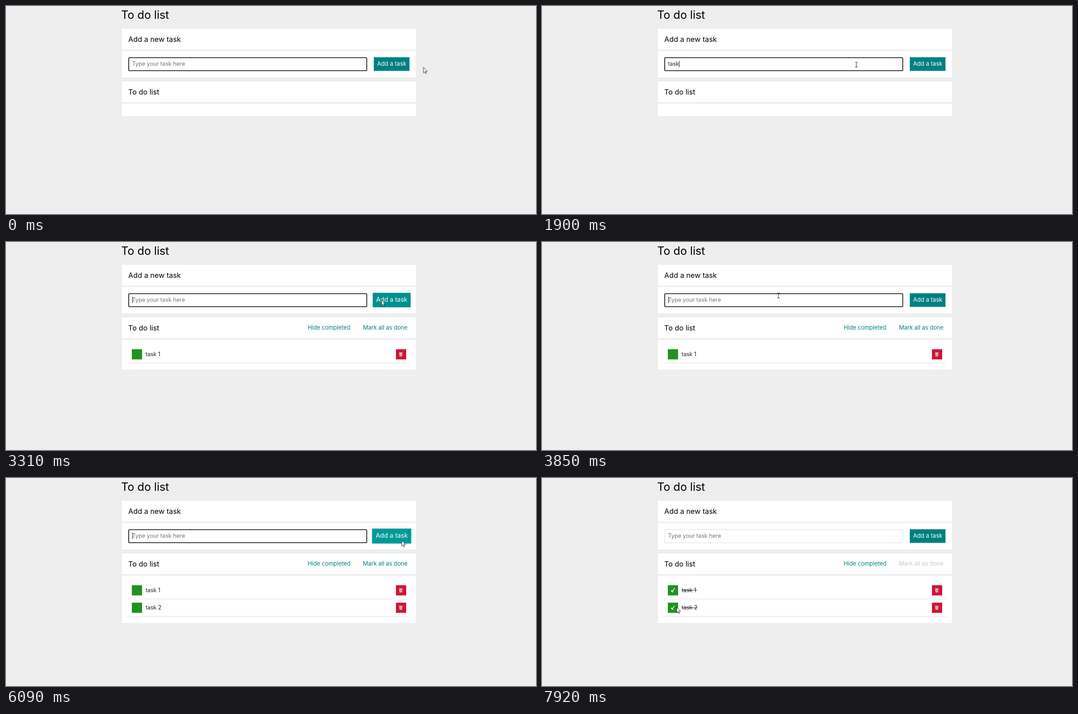
Animation, 1192 px wide and 470 px high, one loop 8 s. Source, as an HTML page:

```html
<!DOCTYPE html>
<html lang="en">
<head>
<meta charset="utf-8">
<title>To do list</title>
<style>
  html, body { margin: 0; width: 100%; height: 100%; overflow: hidden; background: #eee; }
  svg { display: block; width: 1192px; height: 470px; }
  text { font: 400 12.4px Inter, "Open Sans", sans-serif; fill: #222; white-space: pre; }
  .title { font-size: 25.2px; fill: #000; }
  .head { font-size: 16.3px; fill: #000; }
  .link { font-size: 12.9px; fill: #008080; }
  .hint { font-size: 12.7px; fill: #757575; }
  .card { fill: #fff; stroke: #e3e3e3; }
  .rule { fill: #e6e6e6; }

  .add, .add rect, .list, .item1, .item2, .done1, .done2, .focus, .blur,
  .markall, .pointer, .arrow, .beam { animation: 8s linear infinite; }
  .list, .item1, .item2, .done1, .done2, .focus, .blur, .arrow, .beam { animation-timing-function: step-end; }

  .list { animation-name: grow; }
  .item1 { animation-name: show1; }
  .item2 { animation-name: show2; }
  .done1, .blur { animation-name: check1; }
  .done2 { animation-name: check2; }
  .focus { animation-name: unfocus; }
  .markall { animation-name: fade; }
  .arrow { animation-name: arrow; }
  .beam { animation-name: beam; }
  .pointer { animation-name: move; }
  .add { transform-origin: 867.4px 131.2px; animation-name: swell; }
  .add rect { animation-name: tint; }
  .add text { font-size: 13.1px; fill: #fff; }

  @keyframes grow { 0% { height: 80.5px } 39.5% { height: 119.9px } 75.125%, 100% { height: 159.3px } }
  @keyframes show1 { 0% { visibility: hidden } 39.5%, 100% { visibility: visible } }
  @keyframes show2 { 0% { visibility: hidden } 75.125%, 100% { visibility: visible } }
  @keyframes check1 { 0% { visibility: hidden } 86.5%, 100% { visibility: visible } }
  @keyframes check2 { 0% { visibility: hidden } 95%, 100% { visibility: visible } }
  @keyframes unfocus { 0% { visibility: visible } 86.5%, 100% { visibility: hidden } }
  @keyframes fade { 0%, 95% { fill: #008080 } 98%, 100% { fill: #c8c8c8 } }
  @keyframes swell {
    0%, 4.75%, 8.7%, 33.75%, 43%, 69.6%, 80.5%, 100% { transform: scale(1) }
    6.3% { transform: scale(1.07) }
    36.25%, 40.5%, 72.4%, 78% { transform: scale(1.1) }
  }
  @keyframes tint {
    0%, 4.75%, 8.7%, 33.75%, 43%, 69.6%, 80.5%, 100% { fill: #008080 }
    6.3% { fill: #009292 }
    36.25%, 40.5%, 72.4%, 78% { fill: #009999 }
  }
  @keyframes arrow {
    0%, 33.6%, 69.4%, 100% { visibility: visible }
    6.7%, 43% { visibility: hidden }
  }
  @keyframes beam {
    0%, 33.6%, 69.4%, 100% { visibility: hidden }
    6.7%, 43% { visibility: visible }
  }
  @keyframes move {
    0%, 2.625% { transform: translate(938.5px, 138px) }
    3.75% { transform: translate(925px, 138px) }
    5.6% { transform: translate(860px, 137px) }
    7.5% { transform: translate(770px, 134px) }
    10% { transform: translate(715px, 132.5px) }
    12.25%, 31.625% { transform: translate(707px, 132.5px) }
    33% { transform: translate(790px, 129px) }
    34.6% { transform: translate(903px, 129px) }
    36.375%, 40.2% { transform: translate(884.5px, 132.5px) }
    41.5% { transform: translate(840px, 130px) }
    43% { transform: translate(720px, 124px) }
    45.5% { transform: translate(565px, 120px) }
    47%, 51% { transform: translate(532px, 121px) }
    51.1%, 68.375% { transform: translate(531px, 122px) }
    69.4% { transform: translate(800px, 133px) }
    72.25%, 77% { transform: translate(889.5px, 140.5px) }
    78% { transform: translate(872px, 146px) }
    79% { transform: translate(700px, 175px) }
    80% { transform: translate(530px, 205px) }
    81% { transform: translate(400px, 230px) }
    82.2% { transform: translate(318px, 243px) }
    83.6%, 89.375% { transform: translate(297px, 244px) }
    91% { transform: translate(299px, 264px) }
    93% { transform: translate(302px, 288px) }
    94.5%, 100% { transform: translate(302.5px, 291.5px) }
  }
</style>
</head>
<body>
<svg viewBox="0 0 1192 470">
  <defs>
    <g id="row">
      <rect x="283" y="242.3" width="23" height="23" fill="#229122"/>
      <rect x="877" y="242.3" width="23" height="23" fill="#d11339"/>
      <path d="M884.2 249.8h7.4l-.9 8.6h-5.6z" fill="#e3cfb4"/>
      <path d="M883.8 249.3h8.2M886.2 251.5l.4 6M888 251.5v6M889.7 251.5l-.4 6" stroke="#a9876a" stroke-width=".8" fill="none"/>
      <rect x="275" y="272.8" width="633" height="1" fill="#ddd"/>
    </g>
    <path id="tick" d="M290 254.4l2-1.3 1.5 2.3c1.2-3 2.6-5.2 5-6.9l.6.7c-2.2 2.5-3.7 5.5-4.8 9.3h-1.6z" fill="#fff"/>
  </defs>

  <text class="title" x="259" y="29">To do list</text>

  <rect class="card" x="259.5" y="50.5" width="664" height="112"/>
  <text class="head" x="275" y="80.5">Add a new task</text>
  <rect class="rule" x="260" y="99" width="663" height="2"/>
  <rect class="blur" x="275.5" y="116.5" width="536" height="30" fill="#fff" stroke="#ddd"/>
  <rect class="focus" x="276" y="116.7" width="535.4" height="29.5" rx="2" fill="#fff" stroke="#000" stroke-width="1.6"/>
  <text class="hint" id="hint" x="283.5" y="135">Type your task here</text>
  <text id="entry" x="283.5" y="135"></text>
  <path id="wavy" d="M284 137.8l1.5-1.5 1.5 1.5 1.5-1.5 1.5 1.5 1.5-1.5 1.5 1.5 1.5-1.5 1.5 1.5 1.5-1.5 1.5 1.5 1.5-1.5 1.5 1.5 1.5-1.5 1.5 1.5 1.5-1.5 1.5 1.5" fill="none" stroke="#f33"/>
  <rect id="caret" y="124" width="1" height="14"/>
  <g class="add">
    <rect x="827.2" y="115.8" width="80.3" height="30.8"/>
    <text x="867.5" y="135" text-anchor="middle">Add a task</text>
  </g>

  <rect class="card list" x="259.5" y="169.5" width="664" height="80.5"/>
  <text class="head" x="275" y="199.5">To do list</text>
  <rect class="rule" x="260" y="218" width="663" height="2"/>
  <g class="item1">
    <text class="link" x="678.5" y="197.5">Hide completed</text>
    <text class="link markall" x="903" y="197.5" text-anchor="end">Mark all as done</text>
    <use href="#row"/>
    <text x="314" y="258">task 1</text>
  </g>
  <g class="done1">
    <use href="#tick"/>
    <rect x="314" y="253" width="34" height="1" fill="#222"/>
  </g>
  <g class="item2">
    <use href="#row" y="39.4"/>
    <text x="314" y="297.4">task 2</text>
  </g>
  <g class="done2">
    <use href="#tick" y="39.4"/>
    <rect x="314" y="292.5" width="36" height="1" fill="#222"/>
  </g>

  <g class="pointer">
    <path class="arrow" d="M.5.5v12.6l2.8-2.6 1.9 4.4 2-.8-1.9-4.3h3.9z" fill="#fff" stroke="#111" stroke-width=".9"/>
    <path class="beam" d="M-3-5.5h2l1 .7 1-.7h2M0-5v10M-3 5.5h2l1-.7 1 .7h2" fill="none" stroke="#222"/>
  </g>
</svg>
<script>
  const typing = [
    [0, ''], [1210, 't'], [1290, 'ta'], [1440, 'tas'], [1900, 'task'], [2070, 'task '], [2130, 'task 1'],
    [3160, ''], [4080, 't'], [4150, 'ta'], [4320, 'tas'], [4780, 'task'], [4930, 'task '], [5090, 'task 2'],
    [6010, '']
  ];
  const caretOn = [[440, 970], [1210, 2530], [3160, 3690], [3770, 5470], [6010, 6530]];
  const lead = 20; // the script runs about one frame before the paint
  const [hint, entry, wavy, caret] = ['hint', 'entry', 'wavy', 'caret'].map(id => document.getElementById(id));
  const show = (el, on) => { el.style.visibility = on ? 'visible' : 'hidden'; };

  // Typing follows the clock of the pointer animation.
  const clock = document.querySelector('.pointer').getAnimations()[0];

  function draw() {
    const t = ((clock.currentTime || 0) + lead) % 8000;
    const text = typing.findLast(([start]) => start <= t)[1];
    if (entry.textContent !== text) entry.textContent = text;
    show(hint, !text);
    show(wavy, text.length > 4);
    show(caret, caretOn.some(([from, to]) => t >= from && t < to));
    caret.setAttribute('x', Math.round(284 + (text ? entry.getComputedTextLength() : 0)));
    requestAnimationFrame(draw);
  }
  draw();
</script>
</body>
</html>
```
